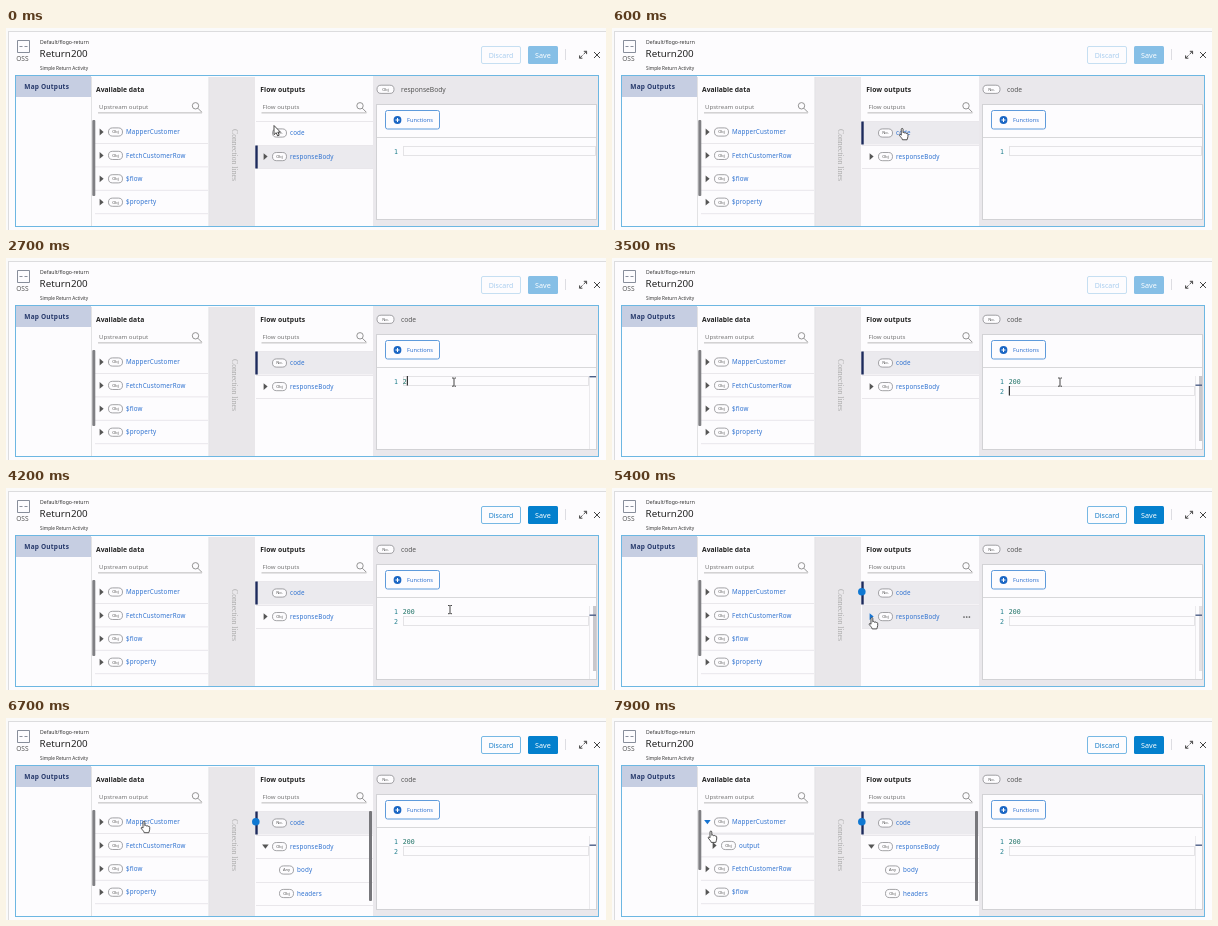
Animation of 600 by 202 pixels, one loop 8 s. Source, as an HTML page:

```html
<!DOCTYPE html>
<html lang="en">
<head>
<meta charset="utf-8">
<title>Map outputs</title>
<style>
html, body { margin: 0; width: 100%; height: 100%; overflow: hidden; background: #fff; }
svg { display: block; width: 600px; height: 202px; font-family: "Noto Sans", sans-serif; }
text { white-space: pre; }
.mono { font-family: "DejaVu Sans Mono", monospace; }
.serif { font-family: "Liberation Serif", serif; }
</style>
</head>
<body>
<svg viewBox="0 0 600 202"><g id="base"></g><g id="live"></g></svg>
<script>
const LOOP = 8000;
const BLUE = '#2f72d0', NAVY = '#1c2a5c', INK = '#333';
const PAPER = '#fdfcfe', LINE = '#e9e7eb', HOVER = '#ebeaee', PANEL = '#eae8ec';

const rect = (x, y, w, h, fill, extra = '') =>
  `<rect x="${x}" y="${y}" width="${w}" height="${h}" fill="${fill}" ${extra}/>`;
const path = (d, stroke, width = 1, fill = 'none', extra = '') =>
  `<path d="${d}" stroke="${stroke}" stroke-width="${width}" fill="${fill}" ${extra}/>`;
const text = (s, x, y, size, fill, extra = '') =>
  `<text x="${x}" y="${y}" font-size="${size}" fill="${fill}" ${extra}>${s}</text>`;
const circle = (x, y, r, fill, extra = '') =>
  `<circle cx="${x}" cy="${y}" r="${r}" fill="${fill}" ${extra}/>`;

function pill(x, y, label, w = 14) {
  return rect(x, y - 4.1, w, 8.2, PAPER, 'rx="4.1" stroke="#8c8c90" stroke-width=".8"') +
    text(label, x + w / 2, y + 1.4, 4, '#555', 'text-anchor="middle"');
}

function triangle(x, y, open, hot) {
  const d = open ? `M${x - 1.5} ${y - 2}h6.6l-3.3 4.2z` : `M${x} ${y - 3.4}v6.8l4 -3.4z`;
  return path(d, 'none', 0, hot ? '#1774d1' : '#555');
}

// One tree entry; "arrow" is '', 'closed' or 'open'.
function row(x, y, name, type, arrow, hot) {
  return (arrow ? triangle(x - 8.4, y, arrow === 'open', hot) : '') + pill(x + .5, y, type) +
    text(name, x + 18, y + 2.2, 6.25, BLUE, 'letter-spacing=".15"');
}

const rule = (x, y, w) => rect(x, y, w, 1, LINE);

function search(x, right, hint) {
  return text(hint, x + 1, 80.5, 6.1, '#777') + rect(x, 84.5, right - x, .8, '#aaa') +
    circle(right - 6.5, 77.8, 3.2, 'none', 'stroke="#888" stroke-width=".9"') +
    path(`M${right - 4.2} 80.2l4 4`, '#888', .9);
}

function drawBase() {
  return rect(0, 0, 600, 202, '#fafafa') + rect(2.5, 3.5, 600, 200, PAPER, 'stroke="#dcdcde"') +
    // Title bar
    path('M14 12.5H11.5V24.5H14M20 12.5H23.5V24.5H20M14 12.5h6M14 24.5h6M13.5 18.5h3M18.5 18.5h3', '#7b8290', .9) +
    text('OSS', 10.2, 33, 6.6, '#555') +
    text('Default/flogo-return', 34, 16.4, 5.14, INK) +
    text('Return200', 33.6, 29.3, 9.8, '#222') +
    text('Simple Return Activity', 34, 42.4, 4.7, INK) +
    rect(559, 21, 1, 11, '#dddde2') +
    path('M577.6 26.2L580.5 23.3M577.8 23.3h2.8v2.8M576.4 27.4L573.6 30.2M573.6 27.4v2.8h2.8', '#444', 1) +
    path('M588 24l6 6M594 24l-6 6', '#444', 1) +
    // Columns
    rect(10, 48, 75, 21, '#c6cee2') +
    text('Map Outputs', 18.3, 61.3, 6.5, '#26396b', 'font-weight="700" letter-spacing=".2"') +
    rect(85, 49, 1, 149, '#e2e2e4') +
    rect(203, 49, 46, 149, '#e9e7ea') + rect(202.5, 49, .7, 149, '#dddde0') +
    text('Connection lines', 0, 0, 7.7, '#aaa', 'class="serif" transform="translate(225.8 101) rotate(90)"') +
    text('Available data', 90, 64, 6.75, '#222', 'font-weight="700"') +
    text('Flow outputs', 254.3, 64, 6.75, '#222', 'font-weight="700" letter-spacing=".08"') +
    search(92, 196, 'Upstream output') + search(255.5, 360.5, 'Flow outputs') +
    // Editor card
    rect(367, 48, 225, 150, PANEL) +
    rect(370.5, 76.5, 220, 115, PAPER, 'stroke="#d2d2d5"') + rect(371, 109, 219, 1, '#d8d8da') +
    rect(379.5, 82.5, 54, 18.5, PAPER, 'rx="2" stroke="#5f9bdb"') +
    circle(391.5, 92, 3.9, '#1a66c4') + path('M389.5 92h4M391.5 90v4', '#fff', 1) +
    text('Functions', 401, 93.6, 5.7, BLUE) +
    rect(9.5, 47.5, 583, 151, 'none', 'stroke="#6db7e2"');
}

function drawButtons(on) {
  return rect(475.5, 18.5, 39, 17, PAPER, `rx="1.5" stroke="${on ? '#77b8e4' : '#c6dff2'}"`) +
    text('Discard', 482.7, 29.5, 7, on ? '#1b7fc9' : '#a9cdee') +
    rect(522, 18, 30, 18, on ? '#0480cd' : '#86bfe6', 'rx="1.5"') +
    text('Save', 529, 29.6, 7.2, '#fff');
}

function drawAvailable(t) {
  const open = t >= 7700;
  const items = ['FetchCustomerRow', '$flow', '$property'];
  let out = t >= 7000 ? rect(89, 114.5, 113, 2.5, '#ecebef') : '';
  out += row(102, 104, 'MapperCustomer', 'Obj', open ? 'open' : 'closed', t >= 7400);
  if (open) out += row(109, 127.5, 'output', 'Obj', 'closed');
  items.slice(0, open ? 2 : 3).forEach((name, i) => {
    out += row(102, 127.4 + 23.4 * (i + open), name, 'Obj', 'closed');
  });
  for (let y = 115; y < 190; y += 23.4) out += rule(89, y, 113);
  return out + rect(86.3, 92, 3, open ? 60 : 76, '#808084', 'rx="1"');
}

function drawOutputs(t) {
  const picked = t >= 200, open = t >= 5800, hover = t >= 5300 && t < 6500;
  const y = picked ? 93.5 : 117.5;
  let out = rect(250, y, 117, 23, HOVER);
  if (hover) out += rect(250, 117, 117, 23, HOVER);
  out += [93, 117, 140, ...(open ? [164, 187] : [])].map(v => rule(250, v, 117)).join('');
  out += rect(249.3, y, 2.4, 23, NAVY);
  out += row(266, 105, 'code', 'No.', '') +
    row(266, 128.6, 'responseBody', 'Obj', open ? 'open' : 'closed', hover && !open);
  if (open) {
    out += row(273, 152, 'body', 'Any', '') + row(273, 175.5, 'headers', 'Obj', '') +
      rect(363, 93, 3, 90, '#77777b', 'rx="1"');
  }
  if (hover) out += [352, 354.7, 357.4].map(x => circle(x, 129, .85, '#555')).join('');
  if (t >= 5000) out += circle(249.8, 103.8, 3.8, '#0f78d2');
  return out;
}

function drawEditor(t) {
  const picked = t >= 200;
  const typed = '200'.slice(0, [2700, 2900, 3100].filter(v => t >= v).length);
  const line = t >= 3400 ? 1 : 0, y = 118 + 10 * line;
  const focused = t >= 1400 && t < 4900;
  const caretOn = t < 2600 ? t % 1000 >= 500 || t < 1500 : t < 4000 || t >= 4500;
  let out = pill(371, 61.3, picked ? 'No.' : 'Obj', 17) +
    text(picked ? 'code' : 'responseBody', 395, 63.6, 6.7, '#555') +
    rect(397.5, y + .5, typed ? 185 : 192, 9, 'none', 'stroke="#e2e1e4" stroke-width=".9"');
  out += text('1', 388, 125.6, 6.6, '#23808f', 'class="mono"');
  if (typed) out += rect(583, 118, .8, 73, '#e6e5e9');
  if (line) {
    // The scrollbar fades once the pointer has left the editor.
    const thumb = Math.min(1, Math.max(0, (5600 - t) / 400));
    out += text('2', 388, 135.6, 6.6, '#23808f', 'class="mono"') +
      rect(587, 118, 3.2, 65, '#c9c8cc', `opacity="${thumb}"`);
  }
  out += text(typed, 396.8, 125.6, 6.6, '#1a6f63', 'class="mono"');
  if (typed) out += rect(583.5, line ? 126.5 : 118, 6.5, 1.4, '#4c5f88');
  if (focused && caretOn) out += rect(396.8 + (line ? 0 : typed.length * 4), y, 1.1, 9.5, '#222');
  return out;
}

// Pointer stops: time, x, y
const STOPS = [
  [0, 267, 97.5], [500, 267, 97.5], [900, 356, 109], [1200, 460, 126], [1500, 449, 124],
  [1800, 448, 124], [3900, 448, 124], [4200, 444, 121.5], [4700, 444, 121.5],
  [5300, 259, 129.5], [6400, 259, 129.5], [6700, 137, 103.3], [6900, 137, 103.3], [7300, 98, 113], [8000, 98, 113]
];

function pointerAt(t) {
  const i = STOPS.findIndex(s => s[0] > t);
  const [t0, x0, y0] = STOPS[i - 1], [t1, x1, y1] = STOPS[i];
  const k = (t - t0) / (t1 - t0);
  return [x0 + (x1 - x0) * k, y0 + (y1 - y0) * k];
}

function drawPointer(t) {
  const [x, y] = pointerAt(t);
  const at = `transform="translate(${x} ${y})" stroke-linejoin="round"`;
  if (x > 396) return path('M-2 -4h1.4l.6 .6l.6 -.6h1.4M0 -3.4v7M-2 4.2h1.4l.6 -.6l.6 .6h1.4', '#333', .9, 'none', at);
  const overGap = x > 203 && x < 249;
  if (x > 366 || t < 200 || overGap) {
    return path('M1 0V9.2L3.2 7.2L4.6 10.4L6.2 9.7L4.8 6.6H7.4Z', '#222', .8, '#fff', at);
  }
  return path('M0 1C0 -.3 1.8 -.3 1.8 1V4.4C2.2 3.6 3.4 3.9 3.5 4.8C4 4.1 5.1 4.4 5.2 5.2' +
    'C5.8 4.7 6.7 5 6.7 6V8C6.7 9.4 6 10 5.8 11.4H1.2C.8 9.6 -1 8.4 -1.8 6.9C-2 6 -1 5.6 0 6.8Z',
    '#333', .85, '#fff', at);
}

const base = document.getElementById('base'), live = document.getElementById('live');
base.innerHTML = drawBase();
let shown = -1;

function tick() {
  const t = Math.floor(performance.now() % LOOP / 100) * 100;
  if (t !== shown) {
    shown = t;
    live.innerHTML = drawButtons(t >= 3900) + drawAvailable(t) + drawOutputs(t) + drawEditor(t) + drawPointer(t);
  }
  requestAnimationFrame(tick);
}
tick();
</script>
</body>
</html>
```
